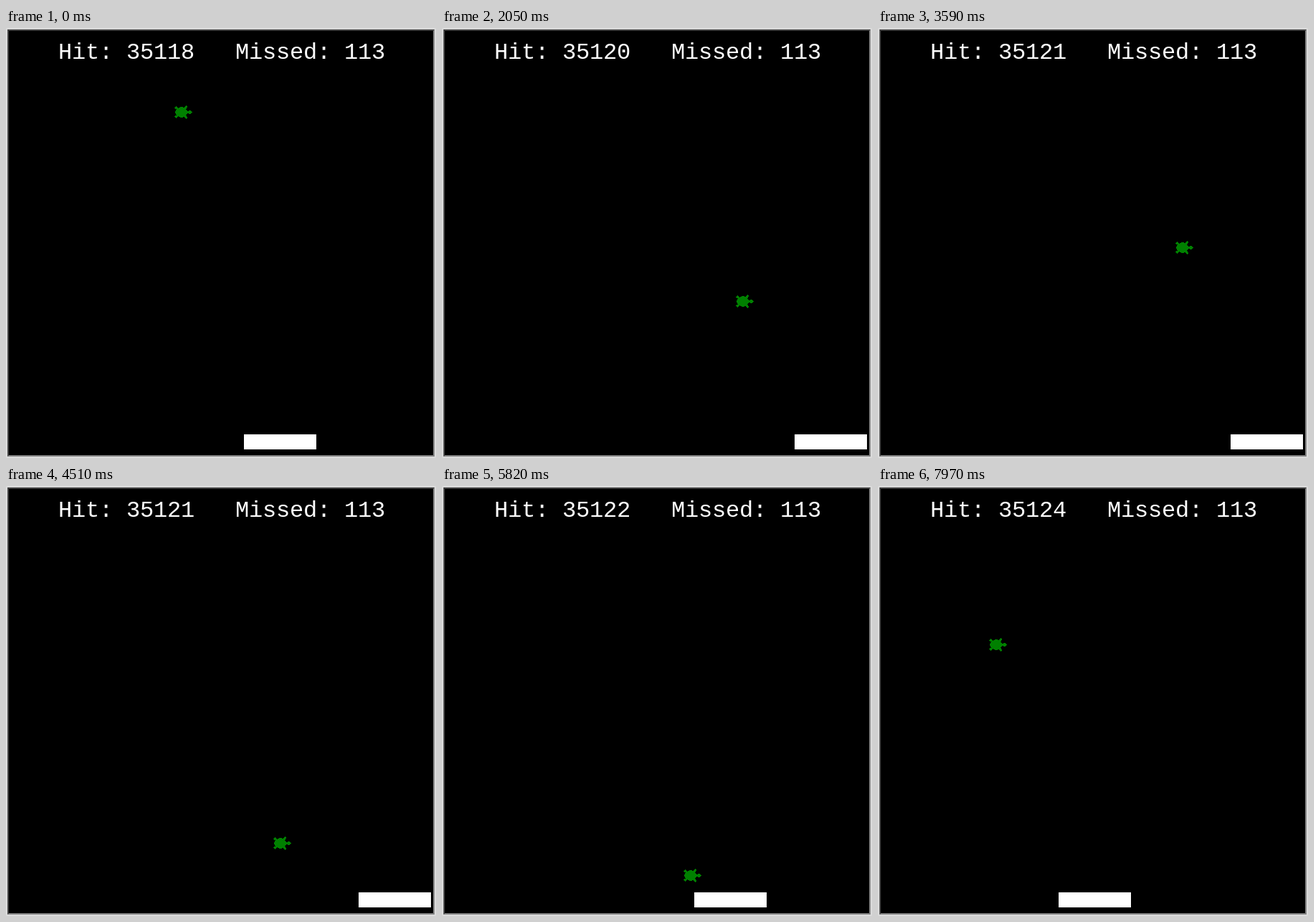
Write an HTML page that moves like this. It is 600 px wide and 600 px high and loops after 8 s.

```html
<!DOCTYPE html>
<html lang="en">
<head>
<meta charset="utf-8">
<title>Paddle game</title>
<style>
  html, body { margin: 0; width: 100%; height: 100%; overflow: hidden; background: #d9d9d9; }
  svg {
    position: absolute; left: 2px; top: 2px; width: 596px; height: 596px;
    box-sizing: border-box; background: #000;
    border: 2px solid; border-color: #404040 #808080 #808080 #404040;
  }
  text { font: 32px "Liberation Mono", monospace; letter-spacing: -0.2px; fill: #fff; white-space: pre; }
</style>
</head>
<body>
<svg viewBox="4 4 592 592">
  <rect id="paddle" y="567" width="101" height="21" fill="#fff"/>
  <polygon id="ball" fill="green" stroke="green" stroke-linejoin="round" shape-rendering="crispEdges"/>
  <text id="score" x="73" y="43"></text>
</svg>
<script>
const LOOP = 8000, FRAME = 40;
const EDGE = 12.5, WIDTH = 580.5, HEIGHT = 540;   // the ball's range of travel
const START_X = 230.5, START_Y = 105;
const FIRST_HIT = HEIGHT - START_Y, HIT_EVERY = 2 * HEIGHT;

const [paddle, ball, score] = ["paddle", "ball", "score"].map(id => document.getElementById(id));

// Upper half of the turtle, nose to tail; the lower half mirrors it.
const half = [[16, 0], [14, 2], [10, 1], [7, 4], [9, 7], [8, 9], [5, 6], [1, 7],
  [-3, 5], [-6, 8], [-8, 6], [-5, 4], [-7, 0]];
ball.setAttribute("points", [...half, ...half.map(([x, y]) => [x, -y]).reverse()].join(" "));

// The game's pace drifts: time and distance travelled along each axis.
const pace = [[0, 0], [2050, 1686], [3310, 2604], [4510, 3621], [5820, 4746],
  [6910, 5628], [LOOP, 6630]];

const clamp = (v, low, high) => Math.min(high, Math.max(low, v));
const bounce = (d, size) => size - Math.abs(d % (2 * size) - size);
const ballX = d => EDGE + bounce(d + START_X, WIDTH);
const ballY = d => EDGE + bounce(d + START_Y, HEIGHT);
const snap = v => Math.floor(v) + 0.5;

function distanceAt(time) {
  const i = pace.findIndex(([t]) => t > time);
  const [t0, d0] = pace[i - 1], [t1, d1] = pace[i];
  const held = Math.floor((time - t0) / FRAME) * FRAME;
  return d0 + (d1 - d0) * held / (t1 - t0);
}

// Shortly before each hit the paddle steps towards the ball until it is nearly centred.
function paddleAt(d) {
  const step = 20, lead = 55, stepTime = 15, reach = 30;
  let left = 332;
  for (let hit = FIRST_HIT; hit - lead < d; hit += HIT_EVERY) {
    const gap = ballX(hit) - (left + 50.5);
    const needed = Math.max(0, Math.ceil((Math.abs(gap) - reach) / step));
    const done = clamp(Math.floor((d - hit + lead) / stepTime), 0, needed);
    left = Math.min(492, left + Math.sign(gap) * done * step);
  }
  return left;
}

function draw(time) {
  const d = distanceAt(time);
  const hits = 35118 + Math.floor((d - FIRST_HIT) / HIT_EVERY) + 1;
  ball.setAttribute("transform", `translate(${snap(ballX(d))} ${snap(ballY(d))})`);
  paddle.setAttribute("x", paddleAt(d));
  score.textContent = `Hit: ${hits}   Missed: 113`;
}

const begin = performance.now();
function tick() {
  draw((performance.now() - begin) % LOOP);
  requestAnimationFrame(tick);
}
tick();
</script>
</body>
</html>
```
